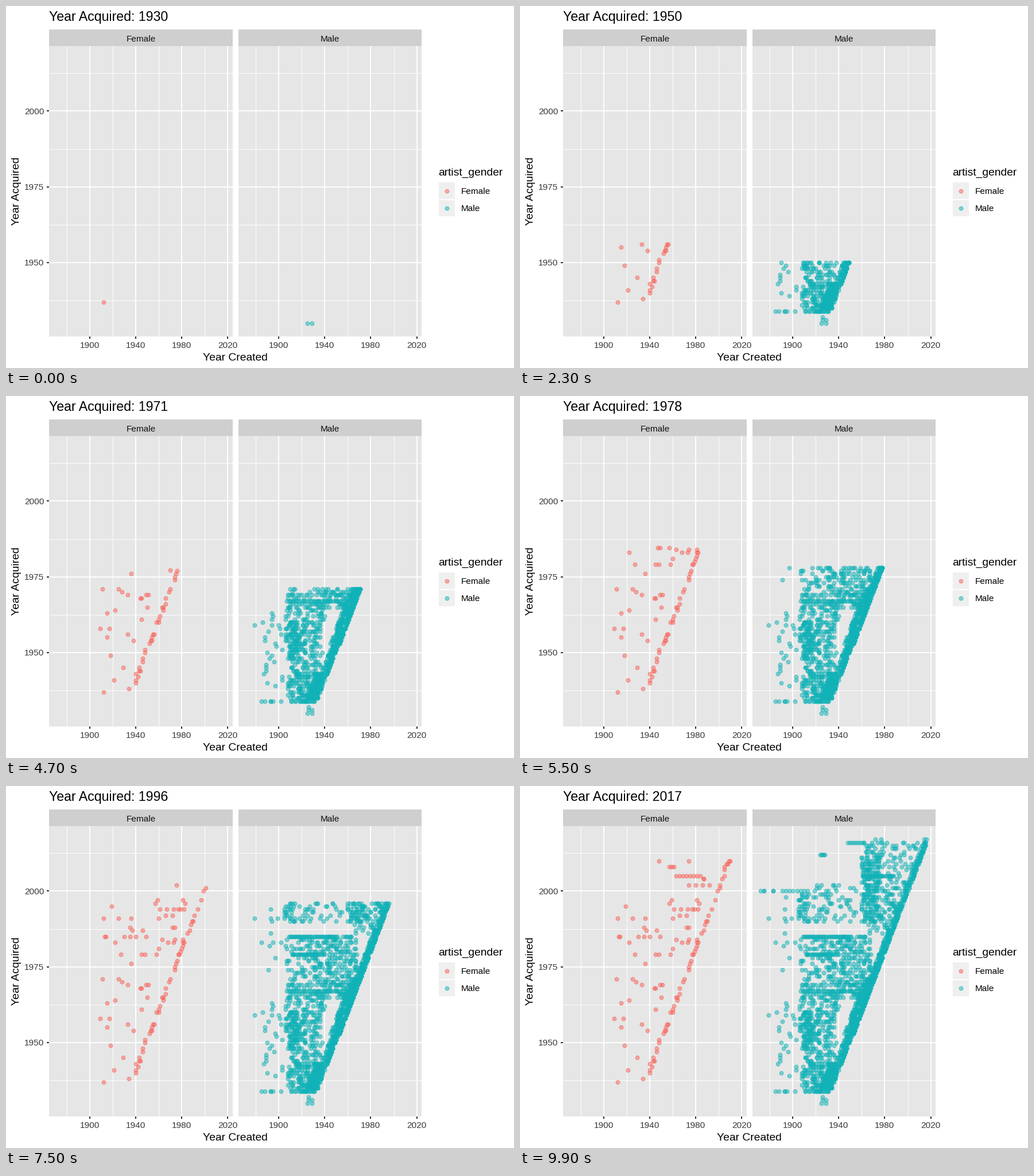
A matplotlib script for the animation above (10 s loop, 885 by 632 pixels).

```python
import numpy as np
import matplotlib.pyplot as plt
from matplotlib.animation import FuncAnimation
from matplotlib.patches import Rectangle

W, H, DPI = 885, 632, 64
FRAMES = 100
PX = 72 / DPI
RED, TEAL = "#f86158", "#10b2b7"
ORIGIN = {"Female": 145.9, "Male": 475.2}
PANEL_W, TOP, BOTTOM = 319.6, 70.3, 576.6

plt.rcParams["font.family"] = "Liberation Sans"
fig = plt.figure(figsize=(W / DPI, H / DPI), dpi=DPI, facecolor="white")
ax = fig.add_axes([0, 0, 1, 1])
ax.set_xlim(0, W)
ax.set_ylim(H, 0)
ax.axis("off")


def px(year, panel):
    return ORIGIN[panel] + (np.asarray(year) - 1900) * 2.003


def py(year):
    return 183.4 + (2000 - np.asarray(year)) * 5.29


def box(x, y, w, h, color, **kw):
    ax.add_patch(Rectangle((x, y), w, h, fc=color, **{"lw": 0, **kw}))


def line(xs, ys, width=1.87, color="white"):
    ax.plot(xs, ys, color=color, lw=width * PX, solid_capstyle="butt", zorder=2)


def label(x, y, s, size=15.4, color="black", ha="left", **kw):
    return ax.text(x, y, s, size=size * PX, color=color, ha=ha,
                   va="baseline", zorder=5, **kw)


def dots(color, xs=(), ys=()):
    return ax.plot(xs, ys, "o", ms=6.84 * PX, mew=1.24 * PX, color=color,
                   alpha=0.5, zorder=4)[0]


# Year bought -> years made
FEMALE_OLD = {
    1937: [1912], 1938: [1934], 1941: [1921], 1945: [1929], 1949: [1918],
    1954: [1938], 1955: [1915], 1956: [1933], 1958: [1909, 1917],
    1961: [1945], 1963: [1915], 1964: [1922], 1965: [1950],
    1968: [1944, 1945], 1969: [1933, 1949, 1951], 1970: [1928],
    1971: [1911, 1925], 1976: [1936], 1979: [1927, 1945, 1948, 1958],
    1981: [1960], 1983: [1922, 1968, 1973], 1984: [1963, 1974, 1981],
    1985: [1935, 1940, 1913, 1914, 1930, 1949], 1987: [1937, 1946],
    1988: [1935, 1972, 1974], 1991: [1912, 1925, 1936, 1960],
    1992: [1966, 1972], 1994: [1977, 1994, 1982], 1995: [1919],
    2010: [1948, 1974],
}
# Year bought, first and last year made, works spread between
FEMALE_ROWS = [(1994, 1961, 1979, 4), (1996, 1957, 1983, 2),
               (1997, 1959, 1981, 2), (2002, 1974, 1992, 4),
               (2005, 1963, 1984, 8), (2008, 1957, 1961, 3)]
# Works usually sell after one year, apart from these
FEMALE_LAGS = {
    0: [1940, 1942, 1964, 1966, 1974, 1987, 1997, 2001, 2005],
    2: [1945, 1948, 1950, 1960, 1968, 2007],
    3: [1943, 1951, 2008],
}
FEMALE_PAIRS = (1944, 1954, 1956, 1960, 1965, 1979, 1983, 1990, 2009, 2010)
FEMALE_GAPS = (1946, 1949, 1952, 1957, 1958, 1959, 1963, 1967, 1969, 1972,
               1973, 1978, 1984, 1985, 1988, 1991, 1993, 1994, 1995, 1996,
               1998, 1999, 2003, 2006)

MALE_OLD = {
    1930: [1925, 1929], 1931: [1926, 1929], 1932: [1926],
    1934: [1885, 1888, 1893, 1893, 1895, 1902], 1959: [1879, 1894],
    1983: [1885, 1895, 1902], 1991: [1879, 1893, 1899],
    2000: [1872, 1875, 1875, 1883, 1883], 2017: [1972, 1977, 2014, 2016],
}
MALE_ROWS = [(1967, 1907, 1962, 30), (1969, 1908, 1962, 14),
             (1979, 1912, 1940, 24), (1985, 1909, 1951, 42),
             (2000, 1891, 1913, 8), (2005, 1961, 1988, 20),
             (2012, 1924, 1928, 5), (2016, 1948, 1960, 7)]
# First and last year bought, range of years made, works per year
MALE_ZONES = [
    (1934, 1943, 1908, 1921, 7), (1935, 1943, 1923, 1934, 8),
    (1944, 1950, 1908, 1938, 9), (1948, 1960, 1910, 1916, 3),
    (1951, 1960, 1906, 1936, 13), (1961, 1966, 1906, 1940, 9),
    (1965, 1971, 1908, 1942, 7), (1972, 1984, 1906, 1942, 8),
    (1965, 1985, 1942, 1968, 9), (1990, 1999, 1905, 1914, 4),
    (1990, 2002, 1918, 1956, 5), (1990, 2011, 1960, 1975, 8),
    (1986, 2011, 1965, 1990, 4), (2012, 2016, 1962, 1990, 7),
]
# First and last year bought, longest lag, works per year
MALE_FRESH = [(1934, 1943, 10, 13), (1944, 1952, 5, 10), (1953, 1970, 8, 15),
              (1971, 1987, 4, 12), (1988, 2016, 3, 5), (1988, 2016, 20, 3)]


def pairs(table):
    return [(made, bought) for bought, xs in table.items() for made in xs]


def spread(rows):
    return [(round(x), y) for y, x0, x1, n in rows
            for x in np.linspace(x0, x1, n)]


def female_works():
    works = pairs(FEMALE_OLD) + spread(FEMALE_ROWS)
    for y in range(1940, 2011):
        if y in FEMALE_GAPS:
            continue
        lag = next((k for k, ys in FEMALE_LAGS.items() if y in ys), 1)
        works.append((y - lag, y))
        if y in FEMALE_PAIRS:
            works.append((y - (0 if y % 2 == 0 else 2), y))
    works += [(1987, 2004)] * 2
    return np.array(works, float)


def male_works():
    rng = np.random.default_rng(12)
    works = pairs(MALE_OLD) + spread(MALE_ROWS)
    works += [(rng.integers(1886, 1904), y) for y in range(1939, 1964)]
    works += [(rng.integers(1890, 1901), y) for y in range(1974, 2000, 4)]
    for y0, y1, x0, x1, n in MALE_ZONES:
        for y in range(y0, y1 + 1):
            works += [(x, y) for x in rng.integers(x0, x1 + 1, n) if x <= y]
    for y0, y1, lag, n in MALE_FRESH:
        for y in range(y0, y1 + 1):
            first = 3 if y < 1937 else 1 if y < 1952 else 0
            lags = first + (lag + 1) * rng.random(n) ** 1.4
            works += [(y - int(k), y) for k in lags]
    works.sort(key=lambda w: w[1])
    return np.array(works, float)


def draw_panel(name):
    x0 = ORIGIN[name] - 70.6
    x1 = x0 + PANEL_W
    box(x0, 41, PANEL_W, TOP - 41, "#cfcfcf")
    box(x0, TOP, PANEL_W, BOTTOM - TOP, "#e6e6e6")
    label(x0 + PANEL_W / 2, 61.5, name, color="#101010", ha="center")
    for year in np.arange(1937.5, 2013, 25):
        line([x0, x1], [py(year)] * 2, 0.93)
    for year in range(1880, 2001, 40):
        line([px(year, name)] * 2, [TOP, BOTTOM], 0.93)
    for year in range(1950, 2001, 25):
        line([x0, x1], [py(year)] * 2)
    for year in range(1900, 2021, 40):
        x = px(year, name)
        line([x, x], [TOP, BOTTOM])
        line([x, x], [BOTTOM, BOTTOM + 4.8], color="#222222")
        label(x, 596.6, str(year), color="#393939", ha="center")


for panel in ORIGIN:
    draw_panel(panel)
for year in range(1950, 2001, 25):
    line([70.5, 75.3], [py(year)] * 2, color="#222222")
    label(66.5, py(year) + 5.5, str(year), color="#393939", ha="right")

title = label(75.3, 26.3, "", 23.1)
label(399.6, 618.8, "Year Created", 19.25, ha="center")
label(23.3, 323.5, "Year Acquired", 19.25, ha="center", rotation=90,
      rotation_mode="anchor")

label(753, 295.5, "artist_gender", 19.25)
for name, color, y in (("Female", RED, 307.4), ("Male", TEAL, 337.6)):
    box(753.2, y, 30.2, 30.2, "#efefef", ec="white", lw=1.87 * PX)
    dots(color, [768.2], [y + 15.1])
    label(793, y + 20.6, name)

female, male = female_works(), male_works()
female_years = np.unique(female[:, 1])
red_dots, teal_dots = dots(RED), dots(TEAL)


def moving_heads(now):
    """Works gliding from one purchase year to the next."""
    k = np.searchsorted(female_years, now, side="right")
    if k == len(female_years) or now in female_years:
        return np.empty((0, 2))
    a, b = female_years[k - 1:k + 1]
    t = (now - a) / (b - a)
    before = female[female[:, 1] == a, 0]
    after = female[female[:, 1] == b, 0]
    return np.array([(p + (q - p) * t, now) for p, q in zip(before, after)][:3])


def place(line2d, works, panel):
    line2d.set_data(px(works[:, 0], panel), py(works[:, 1]))


def update(i):
    year = round(1930 + 87 * i / (FRAMES - 1))
    now = np.interp(i, [0, 23, 39, 55, 65, 84],
                    [1937, 1956, 1970, 1984.5, 1993, 2010])
    title.set_text(f"Year Acquired: {year}")
    shown = female[female[:, 1] <= now]
    place(red_dots, np.vstack([shown, moving_heads(now)]), "Female")
    place(teal_dots, male[male[:, 1] <= year], "Male")
    return title, red_dots, teal_dots


anim = FuncAnimation(fig, update, frames=FRAMES, interval=100, repeat=True,
                     repeat_delay=0, blit=False)
plt.show()
```
